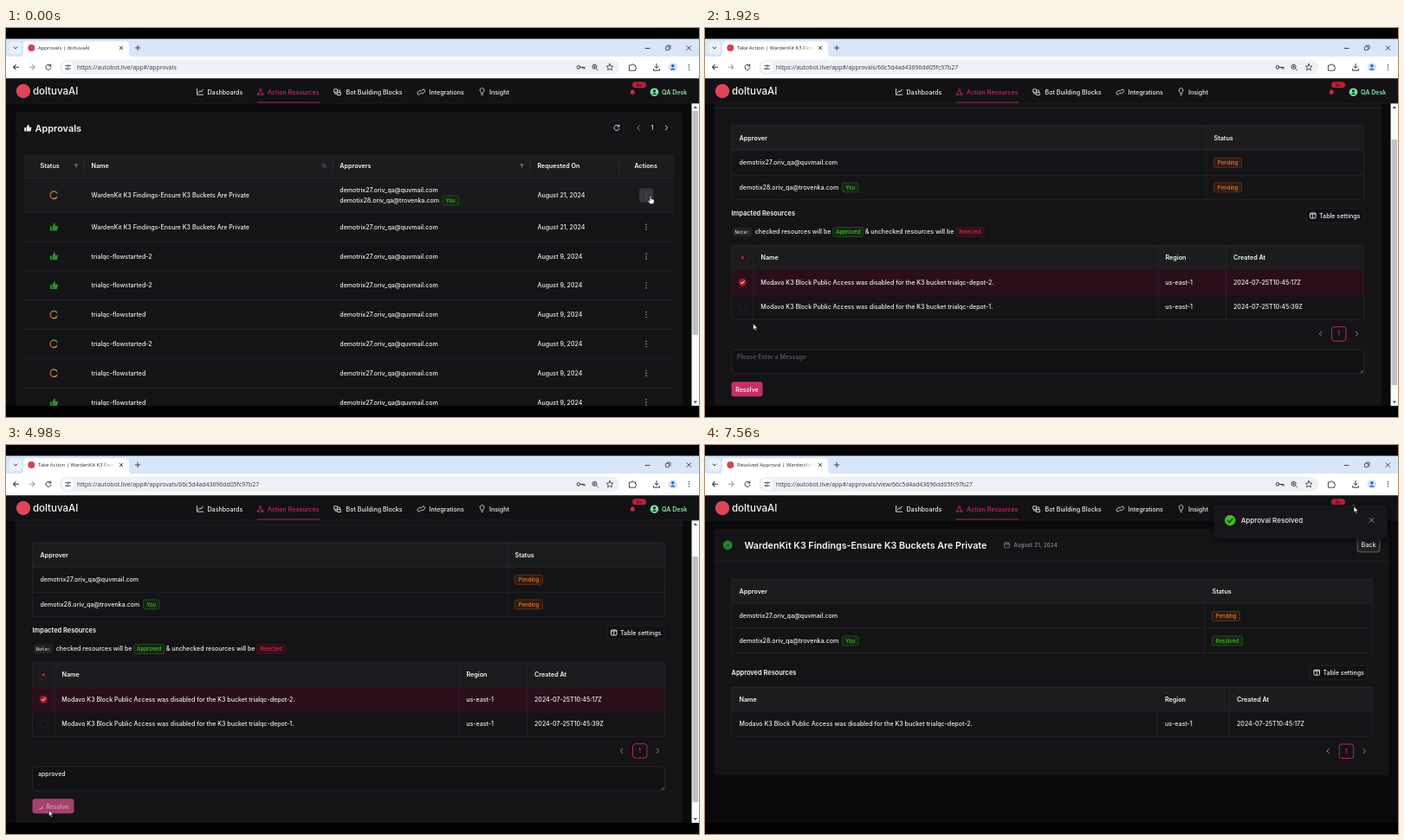
Write an HTML page that moves like this. It is 800 by 450 pixels and loops after 7.62 s.

```html
<!DOCTYPE html>
<html lang="en">
<head>
<meta charset="utf-8">
<title>Approvals</title>
<style>
html,body{margin:0;width:100%;height:100%;overflow:hidden;background:#000}
svg{display:block;width:800px;height:450px;font-family:Inter,sans-serif;font-weight:500}
.ui{font-family:"Open Sans",sans-serif;font-weight:400}
.mono{font-family:"DejaVu Sans Mono",monospace;font-weight:400}
</style>
</head>
<body>
<svg id="stage" viewBox="0 0 800 450" xmlns="http://www.w3.org/2000/svg"></svg>
<script>
const LOOP = 7620, OPEN = 540, DONE = 6420, LOADING = 4140;
const MAIL1 = 'demotrix27.oriv_qa@quvmail.com', MAIL2 = 'demotix28.oriv_qa@trovenka.com';
const TASK = 'WardenKit K3 Findings-Ensure K3 Buckets Are Private';
const ISSUE = 'Modavo K3 Block Public Access was disabled for the K3 bucket trialqc-depot-';
const LINE = '#29272b', HEAD = '#1c1b1e', PANEL = '#141316', PINK = '#c92c66';

// y is the vertical middle of the capitals
const text = (x, y, s, size = 7.05, fill = '#f0f0f0', extra = '') =>
  `<text x="${x}" y="${y + size * .363}" font-size="${size}" fill="${fill}" ${extra}>${s}</text>`;
const bold = (x, y, s, size = 7.2, extra = '') => text(x, y, s, size, '#f6f6f6', `font-weight="600" ${extra}`);
const rect = (x, y, w, h, fill, r = 0, extra = '') =>
  `<rect x="${x}" y="${y}" width="${w}" height="${h}" fill="${fill}" rx="${r}" ${extra}/>`;
const line = (d, color = '#ddd', w = .9, extra = '') =>
  `<path d="${d}" fill="none" stroke="${color}" stroke-width="${w}" stroke-linecap="round" stroke-linejoin="round" ${extra}/>`;
const dot = (x, y, r, fill, extra = '') => `<circle cx="${x}" cy="${y}" r="${r}" fill="${fill}" ${extra}/>`;
const group = (id, s, extra = '') => `<g id="${id}" ${extra}>${s}</g>`;
const at = (x, y, s, scale = 1) => `<g transform="translate(${x} ${y}) scale(${scale})">${s}</g>`;

const tones = {
  green: ['#52b92c', '#142614', '#2a5a25'],
  orange: ['#e57d35', '#2f1b11', '#6b3a1a'],
  red: ['#e02444', '#2f1119', '#4a1622']
};
function tag(x, y, w, s, tone) {
  const [ink, bg, edge] = tones[tone];
  return rect(x, y - 5.5, w, 11, bg, 2, `stroke="${edge}" stroke-width=".7"`) +
    text(x + w / 2, y, s, 6, ink, 'text-anchor="middle"');
}

const dots = (y, c = '#ddd') => [-3, 0, 3].map(d => dot(739, y + d, .65, c)).join('');
const ring = (x, y) => at(x, y, dot(0, 0, 4.2, 'none', 'stroke="#c9683a" stroke-width="1.3"') +
  line('M-2 -3.7A4.2 4.2 0 0 1 3 -2.9', '#5b9447', 1.3) + line('M-1 4.1A4.2 4.2 0 0 0 3 2.9', '#c4913a', 1.3) +
  line('M4.2 -1V1', HEAD, 2));
const thumb = (x, y, c, scale) => at(x, y,
  `<path d="M-4.5 -.5h2v4.7h-2zM-1.8 -.5L.2 -4.5Q2 -4.5 1.4 -1.3H4.2Q5 -.8 4.5 .6L3.5 4.2H-1.8z" fill="${c}"/>`, scale);
const funnel = (x, y) => `<path d="M${x - 2.6} ${y - 2.3}h5.2l-2 2.5v2.4l-1.2 -.6v-1.8z" fill="#6b696e"/>`;
const chevron = (x, y, dir, c = '#999') => line(`M${x - dir * 1.3} ${y - 2.5}L${x + dir * 1.3} ${y}L${x - dir * 1.3} ${y + 2.5}`, c);

function table(x, y, w, heights, cols) {
  const h = heights.reduce((a, b) => a + b);
  let s = rect(x, y, w, h, PANEL) + rect(x, y, w, heights[0], HEAD), yy = y;
  for (const rowH of heights) { s += line(`M${x} ${yy}H${x + w}`, LINE, .7); yy += rowH; }
  s += cols.map(c => line(`M${c} ${y}V${y + h}`, LINE, .7)).join('');
  return s + rect(x, y, w, h, 'none', 2, `stroke="${LINE}" stroke-width=".7"`);
}
function settings(x, y) {
  return rect(x, y - 8, 66, 16, '#111013', 3, `stroke="${LINE}" stroke-width=".7"`) +
    rect(x + 4.5, y - 3, 6.5, 6, 'none', .8, 'stroke="#eee" stroke-width=".9"') +
    line(`M${x + 4.5} ${y - 1.9}h6.5M${x + 7.7} ${y - 2}v5`, '#eee', .8) + text(x + 15, y, 'Table settings', 7.1);
}
function pager(x, y) {
  return chevron(x - 21, y, -1) + rect(x - 8, y - 8, 16.5, 16.5, 'none', 3, `stroke="${PINK}" stroke-width=".9"`) +
    text(x, y, '1', 7, PINK, 'text-anchor="middle"') + chevron(x + 21, y, 1);
}
function scrollbar(id, h) {
  return rect(791.5, 87, 8.5, 350, '#fafafa') + rect(792.5, 96, 6.5, h, '#c1c1c3', 0, `id="${id}"`) +
    '<path d="M793.5 93l2.3-2.8 2.3 2.8zM793.5 431.5l2.3 2.8 2.3-2.8z" fill="#55565a"/>';
}
function title(x, y) {
  return bold(45.5, y, TASK, 10.7) + rect(x, y - 2.6, 6, 5.6, 'none', .7, 'stroke="#8c8a90" stroke-width=".7"') +
    line(`M${x} ${y - .8}h6M${x + 1.6} ${y - 3.4}v1.4M${x + 4.4} ${y - 3.4}v1.4`, '#8c8a90', .7) +
    text(x + 11, y, 'August 21, 2024', 5.8, '#98969c', 'letter-spacing=".35"') +
    line(`M11 ${y + 18.5}H781`, LINE, .7);
}

function browser() {
  const k = '#33363b';
  return rect(0, 12.5, 800, 21, '#d9e5f8') + rect(0, 33, 800, 25.5, '#fff') +
    '<path d="M15 33.5Q20 33.5 20 28V19.5Q20 15.5 24 15.5H138Q142 15.5 142 19.5V28Q142 33.5 147 33.5z" fill="#fff"/>' +
    rect(3.5, 16, 14.5, 14, '#eaf1fc', 4) + line('M9 22l2 2 2-2', k) +
    dot(29.3, 23, 4, '#d83f55') +
    `<g class="ui" clip-path="url(#tabClip)">${text(37, 23, '', 5.9, '#2c2e33', 'id="tab"')}</g>` +
    rect(111, 18, 15, 11, 'url(#fade)') +
    line('M131.3 21.2l3.6 3.6M134.9 21.2l-3.6 3.6M149.4 23h5.4M152.1 20.3v5.4M738 23.5h5M786 20.8l4.6 4.6M790.6 20.8l-4.6 4.6', k) +
    rect(761.5, 21.6, 4, 4, 'none', .6, `stroke="${k}" stroke-width=".8"`) + line('M763 20.2h4v4', k, .8) +
    line('M14.5 45.3H8.6M11.2 42.7l-2.6 2.6 2.6 2.6', k, 1.1) +
    line('M27.2 45.3h5.9M30.5 42.7l2.6 2.6-2.6 2.6', '#9da0a5', 1.1) +
    line('M51.4 43.5A3 3 0 1 0 52 46M51.7 42v2h-2', k, 1) +
    rect(62, 36.7, 646, 17.4, '#edf1f8', 8.7) + dot(71.5, 45.4, 6.5, '#fff') +
    line('M68.6 43.7h2.4M73.2 43.7h1.3M68.6 47.1h1.2M72 47.1h2.5', k, .9) +
    dot(72.1, 43.7, 1, 'none', `stroke="${k}" stroke-width=".7"`) + dot(70.9, 47.1, 1, 'none', `stroke="${k}" stroke-width=".7"`) +
    `<g class="ui">${text(82, 45.4, '', 6.9, '#35383d', 'id="url"')}</g>` +
    dot(661, 45.4, 1.8, 'none', `stroke="${k}"`) + line('M663 45.4h5v1.8M666 45.4v1.6', k, 1) +
    dot(679.5, 44.8, 2.6, 'none', `stroke="${k}" stroke-width=".9"`) + line('M681.4 46.8l2.2 2.2M678.3 44.8h2.4M679.5 43.6v2.4', k, .8) +
    line('M697 41.4l1.1 2.6 2.8.2-2.1 1.9.6 2.8-2.4-1.5-2.4 1.5.6-2.8-2.1-1.9 2.8-.2z', k, .8) +
    line('M719.8 43h2.3a1.2 1.2 0 0 1 2.4 0h2v2.2a1.2 1.2 0 0 1 0 2.4v1.6h-6.7z', k, .9) +
    line('M751 41.5v4.7M748.9 44.4l2.1 2.1 2.1-2.1M747.6 47.5v1.6h6.8v-1.6', k, 1) +
    dot(769.8, 45.3, 5, '#cfe0fb') + dot(769.8, 43.8, 1.7, '#2362c9') + '<path d="M766.6 48.5q3.2-4 6.4 0z" fill="#2362c9"/>' +
    [-2.6, 0, 2.6].map(d => dot(788.5, 45.3 + d, .75, k)).join('');
}

function nav() {
  const w = '#e6e6e6', y = 74;
  return rect(0, 58.5, 800, 28.5, '#121114') + line('M0 87H800', '#222024', .7) +
    dot(20, 73, 8.2, '#dd4658') + text(31, 73.2, 'doltuvaAI', 11.5, '#f4f4f4') +
    line('M220.5 70.5v6.7h7M222 75.2l1.8-2.4 1.5 1.2 2-2.8', w) + text(232.5, y, 'Dashboards', 7.1) +
    dot(293.6, 71.5, 1.2, 'none', `stroke="${PINK}" stroke-width=".8"`) +
    line('M293 72.7l-2 3.3M294.2 72.7l2 3.3M292 77h3.2', PINK, .8) +
    dot(291.1, 76.6, 1, 'none', `stroke="${PINK}" stroke-width=".8"`) + dot(296.3, 76.6, 1, 'none', `stroke="${PINK}" stroke-width=".8"`) +
    text(302, y, 'Action Resources', 7.1, PINK) + line('M290 86H362', '#ad2a5b', .9) +
    rect(378.6, 70.8, 4, 3.4, 'none', .4, `stroke="${w}" stroke-width=".9"`) + rect(382.4, 74.4, 4, 3.2, 'none', .4, `stroke="${w}" stroke-width=".9"`) +
    line('M383 72h2.5v2M382 76.2h-2.3v-1.8', w, .8) + text(392.5, y, 'Bot Building Blocks', 7.1) +
    line('M478.5 75.8l-1 .9a1.7 1.7 0 0 1-2.3-2.4l1.6-1.6a1.7 1.7 0 0 1 2.4 0M480 72.2l1-.9a1.7 1.7 0 0 1 2.3 2.4l-1.6 1.6a1.7 1.7 0 0 1-2.4 0', w) +
    text(488.5, y, 'Integrations', 7.1) +
    line('M548.6 75.3q0-.8-.8-1.5a2.5 2.5 0 1 1 3.6 0q-.8.7-.8 1.5zM548.8 77.3h1.6', w, .8) + text(558, y, 'Insight', 7.1) +
    '<path d="M720.3 76.2q1-1 1-3a2 2 0 0 1 4 0q0 2 1 3zM722.3 76.8h2q-1 1.3-2 0z" fill="#d62a4a"/>' +
    rect(723, 62.2, 16, 7, '#bd1f36', 3.5) + text(731, 65.8, '9+', 5, '#2b070e', 'text-anchor="middle"') +
    dot(748.5, 74.2, 4.8, '#7be0a6') + dot(748.5, 72.9, 1.6, '#14311f') + '<path d="M745.6 77q2.9-3.6 5.8 0z" fill="#14311f"/>' +
    text(757, y, 'QA Desk', 7.1, '#84e3ab', 'font-weight="600"');
}

function listPage() {
  const step = 33.8, flow = 'trialqc-flowstarted';
  const rows = [[1, TASK], [1, flow + '-2'], [1, flow + '-2'], [0, flow], [0, flow + '-2'], [0, flow], [1, flow]];
  let s = rect(11, 97, 770, 350, PANEL, 3) + thumb(25.2, 115.8, '#f2f2f2', .9) + bold(33.6, 115.6, 'Approvals', 10.9) +
    rect(697, 107.5, 16, 16, '#111013', 3, `stroke="${LINE}" stroke-width=".7"`) +
    line('M707.6 113.6A3.1 3.1 0 1 0 708 116.6M708 112v2h-2', '#eee') +
    chevron(730, 115.5, -1) + text(746, 115.5, '1', 7, '#eee', 'text-anchor="middle"') + chevron(762.5, 115.5, 1, '#eee') +
    rect(21, 146, 750, 27.5, HEAD, 3) + rect(21, 173.5, 750, 40, '#1a191c') +
    bold(39.5, 159.3, 'Status') + bold(98.5, 159.3, 'Name') + bold(385.3, 159.3, 'Approvers') +
    bold(613.5, 159.3, 'Requested On') + bold(725.5, 159.3, 'Actions') + funnel(81, 159.5) + funnel(595.5, 159.5) +
    dot(367, 158.8, 1.8, 'none', 'stroke="#6b696e" stroke-width=".8"') + line('M368.4 160.2l1.5 1.5', '#6b696e', .8) +
    line('M90 152v15M377 152v15M605 152v15M707.5 152v15', '#343237', .7) + line('M21 173.5H771M21 213.5H771', LINE, .7) +
    ring(55.3, 193.3) + text(98.5, 193.3, TASK) + text(385.3, 187.6, MAIL1) + text(385.3, 199.3, MAIL2) +
    tag(504, 199.5, 18.5, 'You', 'green') + text(613.5, 193.3, 'August 21, 2024') +
    rect(731, 185.3, 16.5, 16.5, '#38363a', 4) + dots(193.5, '#66646a');
  rows.forEach(([ok, name], i) => {
    const y = 230.2 + step * i;
    s += (ok ? thumb(55.3, y, '#2b8f31') : ring(55.3, y)) + text(98.5, y, name) + text(385.3, y, MAIL1) +
      text(613.5, y, i ? 'August 9, 2024' : 'August 21, 2024') + dots(y) + line(`M21 ${y + 16.9}H771`, LINE, .7);
  });
  return s + scrollbar('listThumb', 259);
}

function takePage() {
  const box = y => rect(39.3, y - 4, 8, 8, '#151317', 2.5, 'stroke="#2c292f" stroke-width=".7"');
  const body = rect(11, 55, 770, 420, PANEL, 3) + ring(26, 73.8) + title(345.5, 73.8) +
    table(30.5, 113, 730, [28.5, 28.8, 28.5], [579]) +
    bold(39.5, 127.2, 'Approver') + bold(587.5, 127.2, 'Status') +
    text(39.5, 155.7, MAIL1) + text(39.5, 184.3, MAIL2) + tag(158.5, 184.4, 18.5, 'You', 'green') +
    tag(587.5, 155.8, 32, 'Pending', 'orange') + tag(587.5, 184.4, 32, 'Pending', 'orange') +
    bold(30.5, 214.2, 'Impacted Resources', 7.45) + settings(694, 217) +
    rect(32, 230.8, 22, 10.5, '#232225', 2) + `<g class="mono">${text(34.6, 236, 'Note:', 5.6)}</g>` +
    text(57.7, 235.8, 'checked resources will be') + tag(147.8, 236, 35, 'Approved', 'green') +
    text(184.8, 235.8, '&amp; unchecked resources will be') + tag(289.6, 236, 33, 'Rejected', 'red') +
    table(30.5, 251.7, 730, [28.4, 28.6, 28.5], []) + rect(30.5, 280.3, 730, 28.3, PANEL, 0, 'id="pickRow"') +
    line('M56 251.7V337M523 251.7V337M601.5 251.7V337', LINE, .7) +
    bold(64.5, 265.7, 'Name') + bold(531.5, 265.7, 'Region') + bold(610, 265.7, 'Created At') +
    [[294, 2, 17], [322.6, 1, 39]].map(([y, n, sec]) => text(64.3, y, ISSUE + n + '.') + text(531.3, y, 'us-east-1') +
      text(610, y, `2024-07-25T10:45:${sec}Z`)).join('') +
    [265.8, 294.2, 322.8].map(box).join('') +
    group('picked', rect(41.6, 264.1, 3.4, 3.4, '#b3182c', .5) + dot(43.3, 294.2, 4.3, '#ac1a2b') +
      line('M41.4 294.3l1.4 1.5 2.5-3', '#fff', 1, 'id="check"')) +
    pager(731.5, 353.7) +
    rect(30.5, 372, 730, 28, '#111013', 3, 'id="area" stroke-width=".9"') + line('M756.8 398.5l2.4-2.4M758.3 398.5l.9-.9', '#aaa', .6) +
    text(37, 380, '', 7, '#eee', 'id="message"') + line('M0 377v6.5', '#eee', .7, 'id="caret"') +
    rect(30.5, 409.3, 36, 17, PINK, 3, 'id="button"') +
    rect(31.2, 410, 34.6, 15.6, 'none', 2.5, 'id="focus" stroke="#ffe3ee" stroke-width=".8" stroke-dasharray="1 1"') +
    text(35.2, 418, 'Resolve', 7.05, '#fff', 'id="label"') +
    line('M35.8 418.2A3.2 3.2 0 0 1 39 415', '#e9b7ca', .9, 'id="spinner"');
  return group('takeBody', body) + scrollbar('takeThumb', 284);
}

function donePage() {
  return rect(11, 97, 778.5, 285, PANEL, 3) + dot(26.2, 115.8, 5.4, '#24872c') + thumb(26.2, 115.8, '#196b22', .55) +
    title(345.5, 115.8) + line('M781 134.3H789', LINE, .7) +
    rect(753, 107.3, 26, 16.6, '#232225', 3, 'stroke="#77757a" stroke-width=".8"') + text(766, 115.6, 'Back', 7.2, '#f4f4f4', 'text-anchor="middle"') +
    table(30.5, 155.3, 739.5, [28.3, 28.5, 28.5], [577]) +
    bold(39.5, 169.3, 'Approver') + bold(585.5, 169.3, 'Status') +
    text(39.5, 197.8, MAIL1) + text(39.5, 226.4, MAIL2) + tag(158.5, 226.5, 18.5, 'You', 'green') +
    tag(585.5, 198, 32, 'Pending', 'orange') + tag(585.5, 226.5, 35, 'Resolved', 'green') +
    bold(30.5, 263, 'Approved Resources', 7.45) + settings(698.5, 263.2) +
    table(30.5, 280.3, 739.5, [28.3, 28.7], [522.3, 605.5]) +
    bold(39.5, 294.4, 'Name') + bold(531, 294.4, 'Region') + bold(614, 294.4, 'Created At') +
    text(39.5, 322.7, ISSUE + '2.') + text(531, 322.7, 'us-east-1') + text(614, 322.7, '2024-07-25T10:45:17Z') + pager(740.2, 354);
}

const toast = rect(587.5, 70, 200, 38, '#19181b', 4, 'filter="url(#shade)"') + dot(606.2, 87.2, 6.2, '#45b52a') +
  line('M603.4 87.4l2 2.1 3.6-4.2', '#10240c', 1.2) + text(618.7, 87.2, 'Approval Resolved', 8) +
  line('M767 84.4l5 5M772 84.4l-5 5', '#aaa', .8);
const pointers =
  `<path id="hand" d="M-.8 .2Q0 -.9 .8 .2V3.1L3.6 3.9Q4.5 4.2 4.3 5.4L3.6 9H-.6L-3 5.4Q-2.8 4.2 -.8 5.4z" fill="#fff" stroke="#111" stroke-width=".6"/>
   <path id="arrow" d="M0 0V7L1.7 5.5L2.8 8L4 7.5L2.9 5.1H5z" fill="#fff" stroke="#111" stroke-width=".6"/>
   <path id="beam" d="M-1.3 -3.5h2.6M0 -3.5v7M-1.3 3.5h2.6" stroke="#353238" stroke-width=".8"/>`;

document.getElementById('stage').innerHTML =
  `<defs><clipPath id="view"><rect y="87" width="800" height="350"/></clipPath>
   <clipPath id="tabClip"><rect x="36" y="14" width="89" height="19"/></clipPath>
   <linearGradient id="fade"><stop stop-color="#fff" stop-opacity="0"/><stop offset="1" stop-color="#fff"/></linearGradient>
   <filter id="shade" x="-10%" y="-40%" width="120%" height="180%"><feDropShadow dx="0" dy="3" stdDeviation="5" flood-opacity=".6"/></filter></defs>` +
  rect(0, 0, 800, 450, '#000') + rect(0, 58, 800, 379, '#0a090b') + browser() +
  `<g clip-path="url(#view)">${group('list', listPage())}${group('take', takePage())}${group('done', donePage())}</g>` +
  nav() + group('toast', toast) + group('pointer', pointers);

const el = {};
document.querySelectorAll('[id]').forEach(n => el[n.id] = n);
const set = (id, name, value) => el[id].setAttribute(name, value);
const show = (id, on) => set(id, 'display', on ? 'inline' : 'none');
const put = (id, s) => { if (el[id].textContent !== s) el[id].textContent = s; };
const ease = (t, a, b) => { const p = Math.min(1, Math.max(0, (t - a) / (b - a))); return p * p * (3 - 2 * p); };

// start, end, x, y of each pointer move
const moves = [[660, 1320, 46, 293], [1680, 2160, 65, 390.5], [3540, 3900, 52, 422.5], [4260, 4440, 49.5, 422.5], [6660, 7560, 749, 71]];

function draw(t) {
  const page = t < OPEN ? 0 : t < DONE ? 1 : 2;
  ['list', 'take', 'done'].forEach((id, i) => show(id, i === page));
  put('tab', ['Approvals | doltuvaAI', 'Take Action | WardenKit K3 Findings', 'Resolved Approval | WardenKit K3'][page]);
  put('url', 'https://autobot.live/app#/approvals' + ['', '/66c5d4ad43696dd05fc97b27', '/view/66c5d4ad43696dd05fc97b27'][page]);

  const scroll = ease(t, 840, 1140);
  set('takeBody', 'transform', `translate(0 ${42 * (1 - scroll)})`);
  set('takeThumb', 'y', 96 + 33 * scroll);

  const picked = t >= 1400, hover = t > 1260 && t < 1780;
  show('picked', picked);
  set('check', 'opacity', ease(t, 1440, 1600));
  set('pickRow', 'fill', picked ? (hover ? '#401429' : '#2a0f1b') : hover ? '#1d1b1f' : PANEL);

  const typing = t >= 2220 && t < LOADING, loading = t >= LOADING;
  const count = Math.max(0, Math.min(8, Math.floor((t - 2500) / 80) + 1));
  set('area', 'stroke', typing ? '#a83560' : LINE);
  put('message', count ? 'approved'.slice(0, count) : 'Please Enter a Message');
  set('message', 'fill', count ? '#eee' : '#5d5b60');
  show('caret', typing && t < 3120);
  const end = count ? 37 + el.message.getComputedTextLength() : 37;
  set('caret', 'transform', `translate(${end + .5} 0)`);

  const over = t >= 3840 && !loading, dim = t >= 2220 && t < 2820;
  set('button', 'fill', loading ? '#a3436c' : over ? '#df5a8f' : dim ? '#983560' : '#c62f69');
  set('button', 'width', 36 + 12 * ease(t, LOADING, LOADING + 180));
  set('label', 'x', 35.2 + 11 * ease(t, LOADING, LOADING + 180));
  set('label', 'fill', loading ? '#d3a0b5' : '#fff');
  show('focus', over);
  show('spinner', loading);
  set('spinner', 'transform', `rotate(${(t - 5880) * .6} 39 418.2)`);

  const note = ease(t, DONE, DONE + 160);
  show('toast', note > 0);
  set('toast', 'opacity', note);

  let x = 744, y = 194.5;
  for (const [a, b, mx, my] of moves) {
    const p = ease(t, a, b);
    x += (mx - x) * p;
    y += (my - y) * p;
  }
  set('pointer', 'transform', `translate(${x} ${y})`);
  const kind = t < 660 || hover || (t > 3840 && t < 4260) ? 'hand' : t > 2100 && t < 3640 ? 'beam' : 'arrow';
  ['hand', 'arrow', 'beam'].forEach(id => show(id, id === kind));
}

function tick() {
  draw(performance.now() % LOOP);
  requestAnimationFrame(tick);
}
tick();
</script>
</body>
</html>
```
